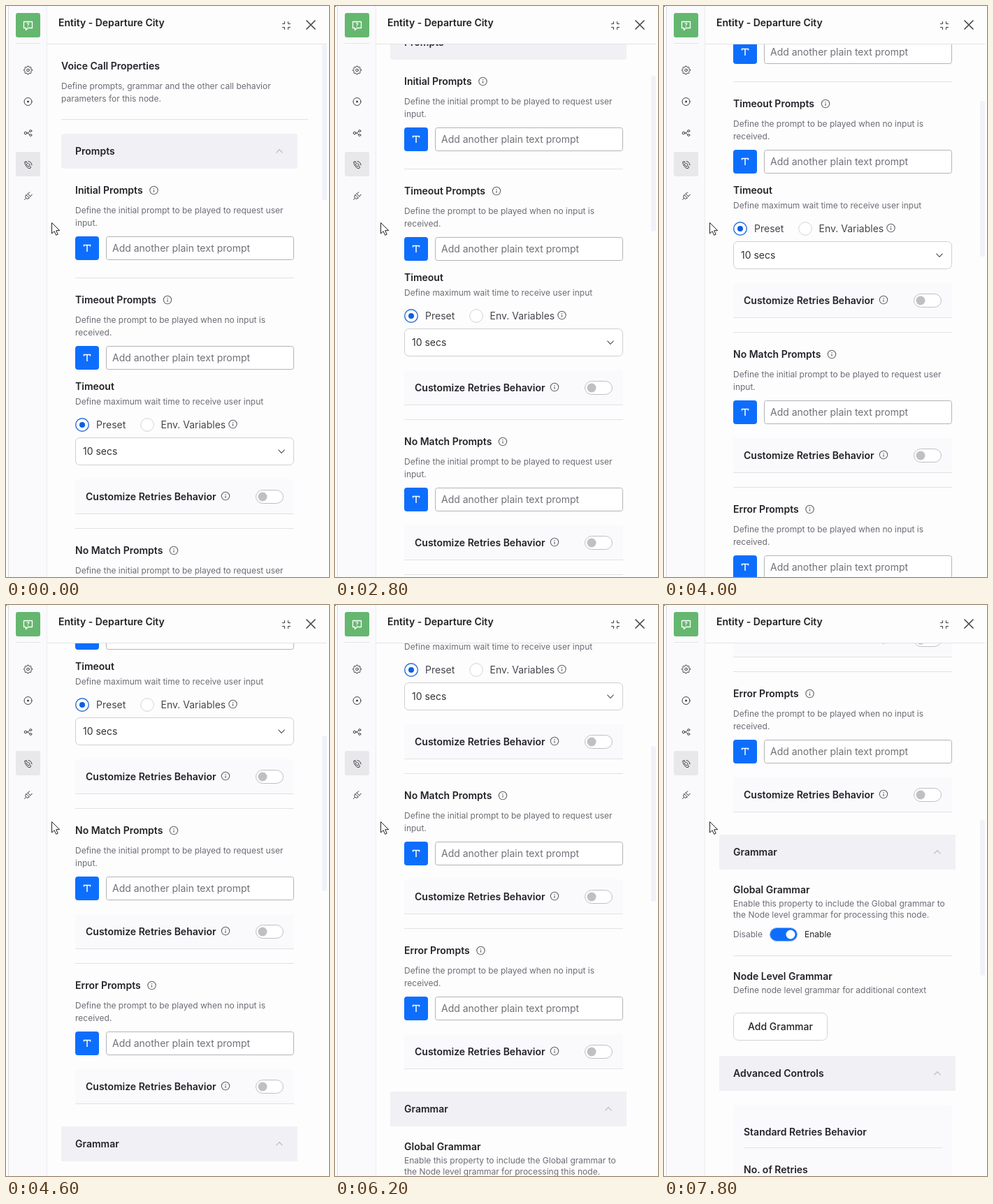
Write an HTML page that moves like this. It is 462x818 px and loops after 8 s.

```html
<!DOCTYPE html>
<html lang="en">
<head>
<meta charset="utf-8">
<title>Voice call properties</title>
<style>
  html, body { margin: 0; width: 100%; height: 100%; overflow: hidden; background: #fdfdfd; }
  svg { display: block; font-family: Inter, sans-serif; }
  .icon { fill: none; stroke: #3c3c42; stroke-width: 1; stroke-linecap: round; stroke-linejoin: round; }
</style>
</head>
<body>
<svg width="462" height="818" viewBox="0 0 462 818">
  <defs><clipPath id="view"><rect x="59" y="55" width="403" height="763"/></clipPath></defs>
  <rect width="462" height="818" fill="#fdfdfd"/>
  <g clip-path="url(#view)"><g id="content"></g></g>
  <rect id="bar" x="452" y="55" width="7" height="223" rx="3" fill="#f1f2f9"/>

  <!-- header -->
  <path d="M59 54.5H459" stroke="#e3e3e7"/>
  <text x="75" y="29" font-size="14" font-weight="600" fill="#202124">Entity - Departure City</text>
  <path class="icon" stroke-width="1.2" d="M395.5 25.5h3v-3M406.5 25.5h-3v-3M395.5 30.5h3v3M406.5 30.5h-3v3"/>
  <path d="M430 21l12 12M442 21l-12 12" stroke="#4a4a50" stroke-width="1.7" stroke-linecap="round"/>

  <!-- side rail -->
  <rect x="4" width="54" height="818" fill="#fafafc"/>
  <path d="M3.5 0V818" stroke="#dcdce0"/>
  <path d="M58.5 0V818" stroke="#ececf0"/>
  <rect x="14" y="10" width="35" height="35" rx="3" fill="#65b770"/>
  <path d="M25.5 22.5h12v9h-6l-3 3v-3h-3z" fill="none" stroke="#fff" stroke-width="1.3" stroke-linejoin="round"/>
  <text x="31.5" y="30" font-size="8" font-weight="700" fill="#fff" text-anchor="middle">?</text>
  <path d="M14 53.5H49" stroke="#e3e3e7"/>
  <rect x="14" y="209" width="35" height="35" rx="3" fill="#e8e7e9"/>
  <g class="icon">
    <path id="gear"/>
    <circle cx="31.5" cy="92" r="1.8"/>
    <circle cx="31.5" cy="137" r="5.5"/>
    <circle cx="31.5" cy="137" r="1" fill="#3c3c42"/>
    <circle cx="28" cy="182" r="1.8"/>
    <circle cx="35.3" cy="179" r="1.5"/>
    <circle cx="35.3" cy="185" r="1.5"/>
    <path d="M29.8 182h1.7l2.3-2.5M31.5 182l2.3 2.5"/>
    <path d="M27 223.5l2-1 1.5 3-1.2 1.3q1 2.2 2.7 3.2l1.4-1 2.3 1.7-1.2 2q-3 .3-5.500-3t-2-6.200M32 225.500q2 .3 2.300 2.500M32 222.500q4.500.5 5 5.300"/>
    <path d="M29 270.500l4.500 4.500q-3 2.500-5 .5t.5-5M31 269l4 4M31 269.500l2-2M34.500 273l2-2M33 267.500l.8-.8M36.500 271l.8-.8M28.500 275.500l-2 2"/>
  </g>

  <path d="M65.500 310.500v15.500l3.600-3.300 2.500 5.600 2.600-1.100-2.500-5.500h5z" fill="#fff" stroke="#222" stroke-linejoin="round"/>
  <rect id="dot" width="1" height="1" fill="#222"/>
</svg>

<script>
const DARK = '#222328', GREY = '#6c6c76', LINE = '#e2e2e6';
const $ = id => document.getElementById(id);

// All y arguments of text and small parts are vertical centres.
const text = (x, y, s, size, weight, fill) =>
  `<text x="${x}" y="${y + (size > 12 ? 5 : 4)}" font-size="${size}" font-weight="${weight}" fill="${fill}">${s}</text>`;
const title = (x, y, s) => text(x, y, s, 14, 600, DARK);
const note = (x, y, s, fill = GREY) => text(x, y, s, 12, 400, fill);
const label = (x, y, s, fill = '#45454d', weight = 400) => text(x, y, s, 14, weight, fill);
const rule = (y, x1 = 99, x2 = 412) => `<path d="M${x1} ${y + .5}H${x2}" stroke="${LINE}"/>`;
const box = (x, y, w, h, r, fill, stroke = 'none') => {
  const inset = stroke === 'none' ? 0 : .5;
  return `<rect x="${x + inset}" y="${y + inset}" width="${w - 2 * inset}" height="${h - 2 * inset}" rx="${r}" fill="${fill}" stroke="${stroke}"/>`;
};
const disc = (x, y, r, fill, stroke = 'none', width = 1) =>
  `<circle cx="${x}" cy="${y}" r="${r}" fill="${fill}" stroke="${stroke}" stroke-width="${width}"/>`;
const info = (x, y) => disc(x + .5, y, 5.7, 'none', '#62626a', 1.1) +
  `<path d="M${x + .5} ${y - .5}v3.300M${x + .5} ${y - 3}v1.200" stroke="#62626a" stroke-width="1.200"/>`;
const chevron = (x, y, dir, color) =>
  `<path d="M${x - 4.5} ${y - 2.3 * dir}l4.500 ${4.6 * dir} 4.500 ${-4.6 * dir}" fill="none" stroke="${color}" stroke-width="1.200"/>`;

const section = (y, s) => box(79, y, 338, 50, y < 200 ? 4 : 1, '#f1f0f4') +
  title(99, y + 25, s) + chevron(391, y + 25, -1, '#b7bacb');

const field = y => box(99, y, 34, 34, 4, '#0d6efd') +
  `<path d="M111.500 ${y + 14.500}v-2h9v2M116 ${y + 12.500}v9.500" fill="none" stroke="#fff" stroke-width="1.500"/>` +
  box(143, y, 269, 34, 3, '#fff', '#b4b4b8') +
  label(152, y + 17, 'Add another plain text prompt', '#707078');

const prompt = (y, name, iconX, line1, line2) => title(99, y, name) + info(iconX, y) +
  note(99, y + 29, line1) + note(99, y + 47, line2) + field(y + 66);

const toggle = (x, y, on) => box(x, y - 10, 40, 20, 10, on ? '#0d6efd' : '#fff', on ? '#8fb4ee' : '#bfbfc3') +
  disc(x + (on ? 30 : 10), y, 6.5, on ? '#fff' : '#c0bfc3');

const retries = y => box(99, y, 313, 50, 0, '#fafafc') + rule(y + 49) +
  title(114, y + 25, 'Customize Retries Behavior') + info(313.5, y + 24) + toggle(357, y + 25, false);

const initial = ['Define the initial prompt to be played to request user', 'input.'];
const noInput = ['Define the prompt to be played when no input is', 'received.'];

$('content').innerHTML = [
  title(79, 86, 'Voice Call Properties'),
  note(79, 115, 'Define prompts, grammar and the other call behavior'),
  note(79, 133, 'parameters for this node.'),
  rule(162, 79, 432),

  section(183, 'Prompts'),
  prompt(264, 'Initial Prompts', 211, ...initial),
  rule(389),
  prompt(421, 'Timeout Prompts', 230.5, ...noInput),
  title(99, 545, 'Timeout'),
  note(99, 567, 'Define maximum wait time to receive user input'),
  disc(109, 600, 9.3, '#fff', '#2b70d8', 1.4), disc(109, 600, 4, '#0d5fe0'),
  label(129, 600, 'Preset'),
  disc(202, 600, 9.3, '#fff', '#d3d3d7'),
  label(221.5, 600, 'Env. Variables'), info(324, 599),
  box(99, 618, 313, 40, 6, '#fff', '#cfcfd3'),
  label(110, 638, '10 secs', '#33333a'), chevron(394, 638, 1, '#55555c'),
  retries(678), rule(748),
  prompt(780, 'No Match Prompts', 239.5, ...initial),
  retries(900), rule(970),
  prompt(1002, 'Error Prompts', 208, ...noInput),
  retries(1122),

  section(1204, 'Grammar'),
  title(99, 1283, 'Global Grammar'),
  note(99, 1303, 'Enable this property to include the Global grammar to'),
  note(99, 1319, 'the Node level grammar for processing this node.'),
  note(99, 1347, 'Disable'), toggle(151, 1347, true), note(201, 1347, 'Enable', DARK),
  rule(1377),
  title(99, 1407, 'Node Level Grammar'),
  note(99, 1427, 'Define node level grammar for additional context'),
  box(99, 1459, 135, 40, 7, '#fff', '#d3d3d7'),
  label(120, 1479, 'Add Grammar', DARK, 500),

  section(1521, 'Advanced Controls'),
  box(99, 1591, 313, 200, 3, '#fafafc'),
  title(114, 1630, 'Standard Retries Behavior'),
  rule(1652, 114, 398),
  title(114, 1684, 'No. of Retries'),
].join('');

// Eight-toothed cog outline.
$('gear').setAttribute('d', 'M' + Array.from({ length: 32 }, (_, i) => {
  const a = (i - .5) * Math.PI / 16, r = i % 4 < 2 ? 6 : 4.7;
  return `${(31.5 + r * Math.cos(a)).toFixed(2)} ${(92 + r * Math.sin(a)).toFixed(2)}`;
}).join('L') + 'Z');

// Recorded wheel scrolling: [start time, scroll position], held until the next entry.
const scroll = [
  [0, 0], [2000, 31], [2200, 109], [2400, 125],
  [2800, 156], [3000, 234], [3200, 250],
  [4000, 281], [4200, 360], [4400, 390], [4600, 457], [4800, 507],
  [6600, 632], [6800, 749], [7000, 757], [7200, 788], [7400, 855], [7600, 875],
];

function draw() {
  const t = performance.now() % 8000;
  const y = scroll.findLast(([start]) => start <= t)[1];
  $('content').setAttribute('transform', `translate(0 ${-y})`);
  $('bar').setAttribute('y', 55 + Math.round(y * .289));
  $('dot').style.opacity = t < 600 ? 0 : 1;
  requestAnimationFrame(draw);
}
draw();
</script>
</body>
</html>
```
